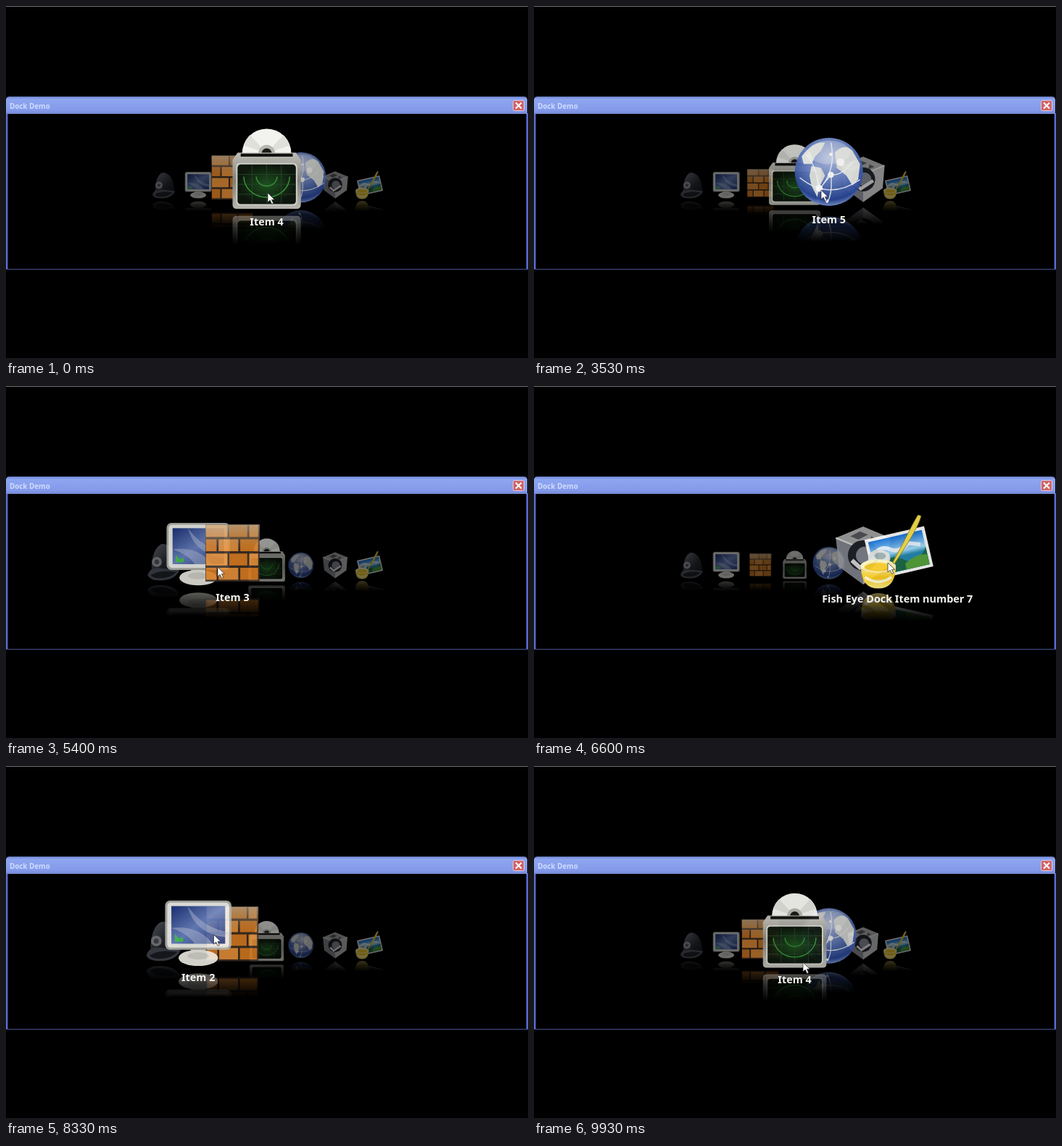
Write an HTML page that moves like this. It is 720 px wide and 486 px high and loops after 10 s.

```html
<!DOCTYPE html>
<html lang="en">
<head>
<meta charset="utf-8">
<title>Dock Demo</title>
<style>
  html, body { margin: 0; width: 100%; height: 100%; overflow: hidden; background: #000; }
  svg { display: block; width: 100vw; height: 100vh; }
  .title { font: bold 9.8px "Noto Sans", "Open Sans", sans-serif; fill: #cfdcff; }
  #label { font: bold 14.4px "Noto Sans", "Open Sans", sans-serif; fill: #f4f4f0; text-anchor: middle; }
</style>
</head>
<body>
<svg viewBox="0 0 720 486">
  <defs>
    <linearGradient id="bar" x2="0" y2="1">
      <stop offset="0" stop-color="#6a80c8"/><stop offset=".15" stop-color="#8ea6f0"/>
      <stop offset=".8" stop-color="#849aea"/><stop offset="1" stop-color="#7488d0"/>
    </linearGradient>
    <linearGradient id="fade" gradientUnits="userSpaceOnUse" x1="0" y1="9" x2="0" y2="25">
      <stop offset="0" stop-color="#848484"/><stop offset="1" stop-color="#000"/>
    </linearGradient>
    <mask id="mirrorMask" maskUnits="userSpaceOnUse" x="-30" y="9" width="60" height="16">
      <rect x="-30" y="9" width="60" height="16" fill="url(#fade)"/>
    </mask>
    <linearGradient id="felt" x2="1" y2="1">
      <stop offset="0" stop-color="#7d818c"/><stop offset=".6" stop-color="#2c2f38"/><stop offset="1" stop-color="#15171d"/>
    </linearGradient>
    <linearGradient id="desktop" x2="1" y2="1">
      <stop offset="0" stop-color="#1d3580"/><stop offset=".5" stop-color="#6f88c8"/><stop offset="1" stop-color="#23408a"/>
    </linearGradient>
    <linearGradient id="brickShine" x2="0" y2="1">
      <stop offset="0" stop-color="#c9c0ae" stop-opacity=".65"/><stop offset=".45" stop-color="#c9a070" stop-opacity="0"/>
    </linearGradient>
    <linearGradient id="metal" x2="0" y2="1">
      <stop offset="0" stop-color="#c0c0b8"/><stop offset=".5" stop-color="#80807a"/><stop offset="1" stop-color="#b8b8b0"/>
    </linearGradient>
    <radialGradient id="radar">
      <stop offset="0" stop-color="#1f5220"/><stop offset="1" stop-color="#0d160d"/>
    </radialGradient>
    <radialGradient id="ocean" cx=".5" cy=".3" r=".72">
      <stop offset="0" stop-color="#b9c6e8"/><stop offset=".45" stop-color="#6a84c4"/>
      <stop offset=".85" stop-color="#2a4796"/><stop offset="1" stop-color="#8aa2d8"/>
    </radialGradient>
    <linearGradient id="sky" x2="0" y2="1">
      <stop offset="0" stop-color="#1672d8"/><stop offset=".45" stop-color="#a4dcf8"/><stop offset=".6" stop-color="#2488b0"/>
    </linearGradient>
    <linearGradient id="paint" x2="0" y2="1">
      <stop offset="0" stop-color="#fff3a0"/><stop offset=".5" stop-color="#fbcb1c"/><stop offset="1" stop-color="#fff08a"/>
    </linearGradient>

    <g id="icon1">
      <path d="M-12-1C-13-14-9-26-2-28.5 8-29 15-16 14-2Z" fill="url(#felt)"/>
      <path d="M-16 2Q-14-6-4-5 8-4 15-3 11 7-4 7-14 7-16 2Z" fill="#555a66"/>
      <path d="M-13 2Q-4-4 12-1 6 5-4 5-11 5-13 2Z" fill="#22252c"/>
      <circle cx="-7" cy="-11" r="4.8" fill="#a9acb4"/><circle cx="-7" cy="-11" r="2.3" fill="#5d616b"/>
    </g>
    <g id="icon2">
      <path d="M-4-3H4L5 3H-5Z" fill="#d4d4cc"/>
      <ellipse cy="2.6" rx="11" ry="4.5" fill="#f0f0e8"/><ellipse cy="1.5" rx="6" ry="2" fill="#d8d8d0"/>
      <rect x="-18.5" y="-29.4" width="37" height="27.5" rx="2.8" fill="#b4b6ae"/>
      <rect x="-17.3" y="-28.3" width="34.6" height="25.2" rx="2" fill="#f8f8f4"/>
      <rect x="-15" y="-26.3" width="30" height="21" fill="url(#desktop)"/>
      <path d="M-6-26.3Q2-15 15-12V-9Q-2-11-6-26.3ZM-15-14Q0-16 8-5.3H-2Q-6-11-15-14Z" fill="#c9d2ea" opacity=".45"/>
      <path d="M-13-11L-11-8 -8.5-9V-6.5H-13Z" fill="#48cf4e"/>
    </g>
    <g id="icon3"></g>
    <g id="icon4">
      <circle cy="-19.2" r="11.8" fill="#f4f4f0"/>
      <path d="M0-19.2L-11-23A11.8 11.8 0 0 1-8-28ZM0-19.2L8-28A11.8 11.8 0 0 1 11-23Z" fill="#e2e2dc"/>
      <circle cy="-19.2" r="4" fill="#b8b8b2"/><circle cy="-19.2" r="2.4" fill="#1c1c1a"/>
      <path d="M-14-19.5H14L16.4-16V5.5Q16.4 7.5 14.4 7.5H-14.4Q-16.4 7.5-16.4 5.5V-16Z" fill="url(#metal)"/>
      <path d="M-12.5-18.3H12.5" stroke="#141412" stroke-width="1.5"/>
      <rect x="-14.7" y="-14.5" width="29.4" height="20.4" rx="1.8" fill="#d0d0c8"/>
      <rect x="-14" y="-13.8" width="28" height="19" rx="1.5" fill="url(#radar)"/>
      <path d="M-14-9H14M-14-4.3H14M-14 .5H14M-7-13.8V5.2M0-13.8V5.2M7-13.8V5.2" stroke="#28482a" stroke-width=".3"/>
      <path d="M-11-8A11 10 0 0 0 11-8M-5-8A5 4.5 0 0 0 5-8" fill="none" stroke="#379238" stroke-width=".5"/>
    </g>
    <g id="icon5">
      <circle cy="-11" r="17.5" fill="url(#ocean)"/>
      <g fill="#e2e4e0">
        <path d="M-14-19Q-8-27-2-26L-4-22 -7-19 -9-15 -13-15Z"/>
        <path d="M-9-14L-4-13 -2-9 -5-3 -6 2 -9-4 -10-9Z"/>
        <path d="M3-21Q8-26 12-22L16-15 15-7 12-4 9-9 4-13Z"/>
      </g>
      <path d="M-15-8Q0 4 16-7M-5-2Q4-12 1-26M-5-2Q-7-16-12-20M1-9.5Q7-9 12-16M-5-2L1-9.5Q2 0-1 5" fill="none" stroke="#f2f5fa" stroke-width=".5"/>
      <g fill="#fff"><circle cx="-5" cy="-2.5" r="1.8"/><circle cx="1" cy="-9.5" r="1.6"/><circle cx="6" cy="-16" r="2"/><circle cx="1" cy="-20" r=".9"/><circle cx="-1" cy="4" r=".8"/></g>
      <ellipse cy="-21" rx="11" ry="6" fill="#fff" opacity=".28"/>
    </g>
    <g id="icon6">
      <path d="M0-15V7L-15-4-17-22Z" fill="#8d8f98"/>
      <path d="M0-15V7L15.5-4 17-22Z" fill="#c6c7c6"/>
      <path d="M0-29L17-22 0-15-17-22Z" fill="#b2b3b2"/>
      <path d="M-8-23L-2-26 3-24-3-21ZM5-23L9-21 4-19Z" fill="#5c5e64"/>
      <path d="M-17-22L0-15 17-22" fill="none" stroke="#eeeeea"/>
      <circle cy="-11" r="9.5" fill="#25272e"/><circle cx="1" cy="-11" r="5.5" fill="#8f929e"/>
      <path d="M-7-8L-2-3.5 8-10" fill="none" stroke="#f0f0f0" stroke-width="2.6"/>
    </g>
    <g id="icon7">
      <g transform="translate(.8 -10.5) rotate(-13)">
        <rect x="-16" y="-10.8" width="32" height="21.6" fill="#f8f8f8"/>
        <rect x="-14.4" y="-9.2" width="28.8" height="18.4" fill="url(#sky)"/>
        <path d="M-14.4 3Q-4-1 2 4T14.4 0V9.2H-14.4Z" fill="#1f6a48"/>
        <path d="M2 6Q9 2 14.4 4V9.2H2Z" fill="#56a03c"/>
        <path d="M-12-3Q-8-6-4-3T6-4L12-2" fill="none" stroke="#fff" stroke-width="2" opacity=".8"/>
      </g>
      <ellipse cx="-9.5" cy="-8" rx="5.8" ry="4.4" fill="#dfe3e2"/><ellipse cx="-9" cy="-9" rx="3" ry="1.8" fill="#9db4b4"/>
      <path d="M-19-3.5Q-19 8-10 8T-.8-3.5Z" fill="url(#paint)"/>
      <ellipse cx="-10" cy="-3.8" rx="9.2" ry="3.4" fill="#fff7c4"/><ellipse cx="-10" cy="-3.2" rx="7.2" ry="2.3" fill="#fcd02c"/>
      <path d="M-17 2Q-10 7-3 2" fill="none" stroke="#fffbd8" stroke-width="1.4"/>
      <path d="M10.8-30.5L12.4-30Q11.6-26 5.6-16L-1.5-5 -2.5-5.5 3.6-17Q8.6-27 10.8-30.5Z" fill="#f6e04c" stroke="#8c7a2a" stroke-width=".3"/>
    </g>
  </defs>

  <rect width="720" height="486"/>
  <path d="M0 .5H720" stroke="#727272"/>
  <path d="M1.2 148V364M718.8 148V364" stroke="#5a6cd0" stroke-width="2.4"/>
  <path d="M0 363.5H720" stroke="#47508c"/>
  <path d="M0 149V130Q0 125 5 125H714Q719 125 719 130V149Z" fill="url(#bar)"/>
  <text class="title" x="5" y="141.7">Dock Demo</text>
  <rect x="699.5" y="130.5" width="15" height="14" rx="2" fill="#cf6468" stroke="#e8c8d4"/>
  <path d="M703 133.5L711 141.5M711 133.5L703 141.5" stroke="#fff" stroke-width="2"/>

  <g id="dock"></g>
  <text id="label"></text>
  <path id="cursor" d="M0 0V13L3.2 10.2 5.6 15.5 7.8 14.5 5.5 9.4H9.5Z" fill="#fff" stroke="#222" stroke-width=".7"/>
</svg>
<script>
const $ = id => document.getElementById(id);
const COUNT = 7, LOOP = 10000, STEP = 1000 / 15;
const BASELINE = 258.5, REACH = 95, GROWTH = 1.9;

// Pointer path: time, x, y
const path = [
  [0, 361, 258], [2460, 361, 258], [2800, 365, 258], [3000, 365, 258], [3533, 396, 254],
  [4333, 492, 256], [4600, 492, 256], [5450, 290, 250], [6300, 488, 244], [6600, 488, 244],
  [7533, 264, 233], [7900, 228, 236], [9067, 416, 226], [9330, 423, 238], [9400, 423, 238], [9933, 371, 271]
];

function brickWall() {
  let wall = '<rect x="-15" y="-27" width="30" height="31.6" fill="#3c2e24"/>';
  for (let row = 0; row < 4; row++) {
    const edges = row % 2 ? [-15, -8, 4, 15] : [-15, -2, 9, 15];
    for (let i = 0; i < 3; i++)
      wall += `<rect x="${edges[i] + .3}" y="${-26.7 + row * 7.9}" width="${edges[i + 1] - edges[i] - 1.1}" height="6.6" fill="${(row + i) % 2 ? '#d97c22' : '#e8923a'}"/>`;
  }
  return wall + '<rect x="-15" y="-27" width="30" height="31.6" fill="url(#brickShine)"/>';
}
$('icon3').innerHTML = brickWall();

$('dock').innerHTML = Array.from({ length: COUNT }, (_, i) =>
  `<g><g mask="url(#mirrorMask)"><use href="#icon${i + 1}" transform="translate(0 18.4) scale(1 -1)"/></g><use href="#icon${i + 1}"/></g>`).join('');
const items = [...$('dock').children].map((node, i) => ({
  node, x: 218 + 47.2 * i,
  name: i === COUNT - 1 ? 'Fish Eye Dock Item number 7' : `Item ${i + 1}`
}));

function pointerAt(time) {
  const next = path.findIndex(key => key[0] > time);
  if (next < 0) return path[path.length - 1].slice(1);
  const [a, b] = [path[next - 1], path[next]];
  const p = (time - a[0]) / (b[0] - a[0]), eased = p * p * (3 - 2 * p);
  return [1, 2].map(i => a[i] + (b[i] - a[i]) * eased);
}

function draw(now) {
  const time = Math.floor((now % LOOP + 6.7) / STEP) * STEP;
  const [x, y] = pointerAt(Math.min(time, LOOP - 1));
  for (const item of items) {
    const near = Math.max(0, 1 - Math.abs(x - item.x) / REACH);
    item.scale = 1 + GROWTH * near;
    item.node.setAttribute('transform', `translate(${item.x} ${BASELINE}) scale(${item.scale})`);
    item.node.setAttribute('opacity', .45 + .55 * near);
  }
  const order = [...items].sort((a, b) => a.scale - b.scale);
  $('dock').append(...order.map(item => item.node));
  const top = order[COUNT - 1];
  $('label').textContent = top.name;
  $('label').setAttribute('x', top.x);
  $('label').setAttribute('y', BASELINE + 15.4 * top.scale);
  $('cursor').setAttribute('transform', `translate(${x} ${y})`);
}

const start = performance.now();
function tick() {
  draw(performance.now() - start);
  requestAnimationFrame(tick);
}
tick();
</script>
</body>
</html>
```
